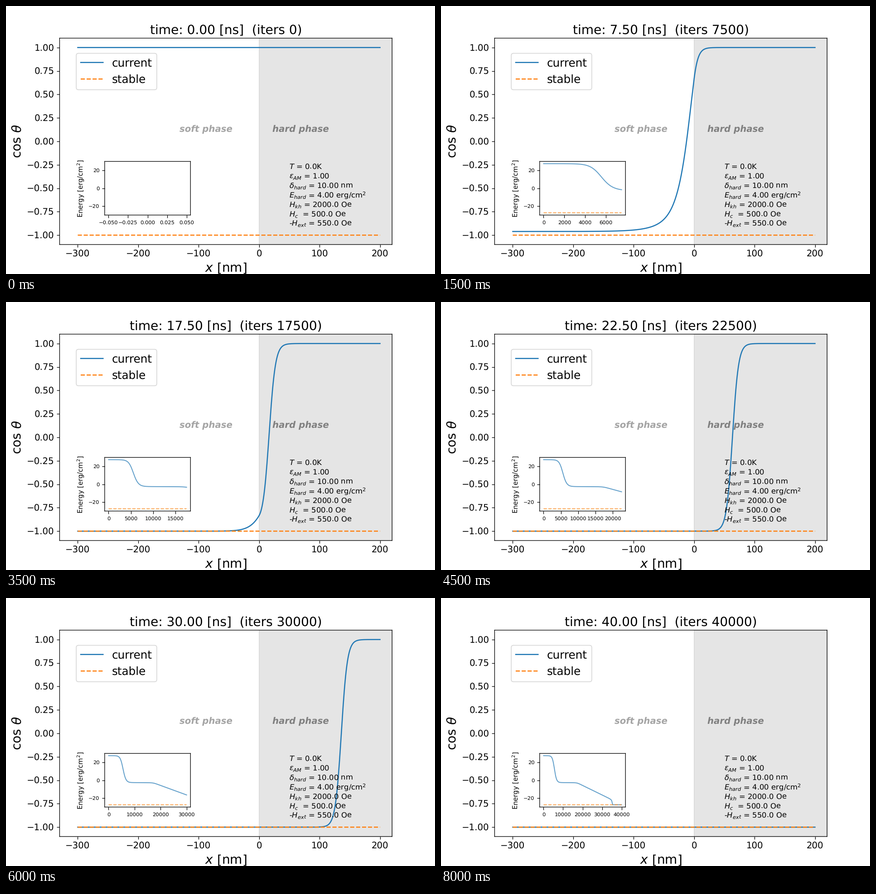
Animation of 947 by 592 pixels, one loop 8.5 s. Source, as a matplotlib script:

```python
import matplotlib.pyplot as plt
import numpy as np
from matplotlib.animation import FuncAnimation

W, H, DPI = 947, 592, 118.4
FRAMES, INTERVAL = 17, 500
STEPS, SAMPLE = 2500, 100        # iterations per frame, per energy sample

# Material: fields in Oe, lengths in nm, one iteration is 1 ps
H_HARD, H_EXT, DELTA = 2000.0, 550.0, 10.0
RATE = 1.76e-6                   # damping * gyromagnetic ratio * time step
EXCHANGE = H_HARD * DELTA ** 2
E_EXCH, E_ANIS, E_ZEEMAN = 10.0, 0.1, 0.055   # erg/cm^2 per nm

# Keep lines and glyphs at their fractional positions and widths
plt.rcParams["path.snap"] = False
plt.rcParams["text.hinting"] = "none"

x = np.linspace(-300, 200, 501)
hard = np.heaviside(x, 0.5)


def energy(theta):
    bulk = E_ANIS * hard * np.sin(theta) ** 2 + E_ZEEMAN * np.cos(theta)
    cells = (bulk[1:] + bulk[:-1]) / 2
    return np.sum(E_EXCH * np.diff(theta) ** 2 + cells)


def simulate():
    """Relax the spin angle; return a profile per frame and the energy samples."""
    theta = np.full(x.size, 0.01)
    padded = np.empty(x.size + 2)
    anisotropy = RATE * H_HARD * hard
    diffusion, drive = RATE * EXCHANGE, RATE * H_EXT
    profiles, energies = [], []
    total = STEPS * (FRAMES - 1)
    for i in range(total + 1):
        if i % SAMPLE == 0:
            energies.append(energy(theta))
            if i % STEPS == 0:
                profiles.append(np.cos(theta))
        padded[1:-1] = theta
        padded[0], padded[-1] = theta[0], theta[-1]
        bend = padded[2:] - 2 * theta + padded[:-2]
        theta = (theta + diffusion * bend
                 + np.sin(theta) * (drive - anisotropy * np.cos(theta)))
    return profiles, np.array(energies)


profiles, energies = simulate()
iters = np.arange(energies.size) * SAMPLE

fig = plt.figure(figsize=((W + 0.01) / DPI, (H + 0.01) / DPI), dpi=DPI)
ax = fig.add_subplot()
ax.axvspan(0, 220, color="gray", alpha=0.2)
current, = ax.plot(x, profiles[0], label="current")
ax.plot(x, np.full(x.size, -1.0), "--", label="stable")
ax.set_xlim(-330, 220)
ax.set_ylim(-1.1, 1.1)
ax.tick_params(labelsize=12)
ax.set_xlabel("$x$ [nm]", fontsize=17)
ax.set_ylabel(r"cos $\theta$", fontsize=17)
title = ax.set_title("", fontsize=17)
ax.legend(loc=(0.05, 0.75), fontsize=15)

phase_font = dict(fontsize=12, style="italic", weight="bold")
ax.text(-132, 0.1, "soft phase", color="#a5a5a5", **phase_font)
ax.text(22, 0.1, "hard phase", color="gray", **phase_font)

notes = [
    "$T$ = 0.0K",
    r"$\varepsilon_{AM}$ = 1.00",
    r"$\delta_{hard}$ = 10.00 nm",
    "$E_{hard}$ = 4.00 erg/cm$^2$",
    "$H_{kh}$ = 2000.0 Oe",
    "$H_{c}$  = 500.0 Oe",
    "-$H_{ext}$ = 550.0 Oe",
]
for row, note in enumerate(notes):
    ax.text(50, -0.3 - 0.1 * row, note, fontsize=10)

inset = fig.add_axes([0.23, 0.22, 0.2, 0.2])
inset.tick_params(labelsize=7)
inset.set_ylabel("Energy [erg/cm$^2$]", fontsize=9)
inset.set_ylim(-30, 30)
trace, = inset.plot([], [], lw=1.2, alpha=0.7)
floor, = inset.plot([], [], "--", lw=1.2, alpha=0.7)


def update(frame):
    now = frame * STEPS
    count = now // SAMPLE + 1
    current.set_ydata(profiles[frame])
    title.set_text(f"time: {now / 1000:.2f} [ns]  (iters {now})")
    trace.set_data(iters[:count], energies[:count])
    floor.set_data([0, now], [-27.5, -27.5])
    margin = 0.05 * now or 0.055
    inset.set_xlim(-margin, now + margin)
    return current, title, trace, floor


anim = FuncAnimation(fig, update, frames=FRAMES, interval=INTERVAL,
                     init_func=lambda: update(0), repeat=True, repeat_delay=0)
plt.show()
```
